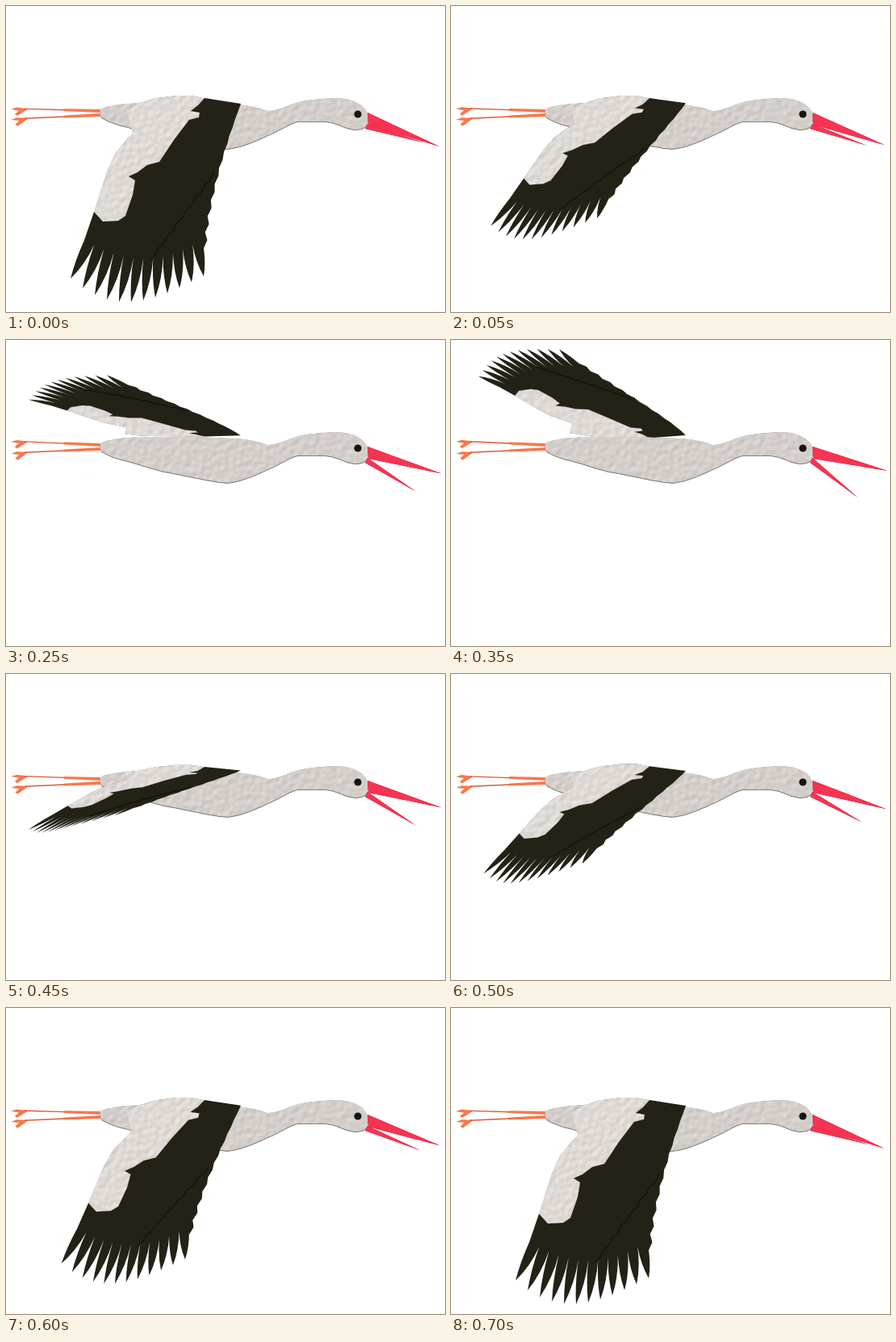
An HTML page for the animation above (750 ms loop, 544 by 379 pixels).

```html
<!DOCTYPE html>
<html lang="en">
<head>
<meta charset="utf-8">
<title>Flying stork</title>
<style>
html, body { margin: 0; width: 100%; height: 100%; overflow: hidden; background: #fff; }
svg { display: block; width: 100vw; height: 100vh; }
#body { fill: #d3cdca; filter: url(#bumps) drop-shadow(0 1px 0 #85807c); }
#white { fill: #ded8d4; filter: url(#bumps) drop-shadow(0 .5px 0 #b5afaa); }
#black { fill: #242116; }
#crease { fill: none; stroke: #0e0d08; }
.beak { fill: #f73352; filter: drop-shadow(0 .8px 0 #8d1730); }
</style>
</head>
<body>
<svg viewBox="0 0 544 379">
  <defs>
    <filter id="bumps" filterUnits="userSpaceOnUse" x="0" y="0" width="544" height="379" color-interpolation-filters="sRGB">
      <feTurbulence type="fractalNoise" baseFrequency=".15" numOctaves="1" seed="4"/>
      <feDiffuseLighting surfaceScale=".55" diffuseConstant="1" lighting-color="#fff" result="light">
        <feDistantLight azimuth="235" elevation="62"/>
      </feDiffuseLighting>
      <feComposite in="SourceGraphic" in2="light" operator="arithmetic" k1="1.14"/>
      <feComposite in2="SourceGraphic" operator="in"/>
    </filter>
    <g id="leg">
      <path d="M0 -2L-44 -1.5 -47 0 -44 1.5 0 2ZM-91 -.5L-104 -1.5 -111 1 -101 2.5 -106 7 -103 9 -91 1Z" fill="#f5794e"/>
      <path d="M-44 0H-94" stroke="#dd5a30" stroke-width="1.3"/>
    </g>
  </defs>
  <use id="topLeg" href="#leg"/>
  <use href="#leg" transform="translate(117 135) rotate(-2.6)"/>
  <path id="body" d="M119 126C135 122 150 120 168 120L240 120 288 122Q310 124 325 130C343 128 352 121 365 118Q388 114 408 114C432 113 450 125 449 140Q449 153 434 153C418 153 412 143 390 143L362 143C348 147 342 153 325 160Q292 176 274 177C250 175 225 168 195 163C172 157 160 152 142 148Q128 144 118 138 114 130 119 126Z"/>
  <g id="wing">
    <path id="white"/>
    <path id="black"/>
    <path id="crease"/>
  </g>
  <path id="lower" class="beak"/>
  <path id="upper" class="beak"/>
  <circle cx="436" cy="134" r="4.6" fill="#17150f"/>
</svg>
<script>
const el = id => document.getElementById(id);
const range = (n, fn) => Array.from({ length: n }, (_, i) => fn(i)).join(' ');

// Wing in its lowest position
const FEATHERS = 12;
const notch = i => [97 + 12.2 * i, 290 + 22 * Math.sin(Math.PI * i / FEATHERS)];
const feathers = range(FEATHERS, i => {
  const [ax, ay] = notch(i), [bx, by] = notch(i + 1);
  const x = 80 + 15 * i, y = 330 + 37 * Math.sin(Math.PI * ((i + .4) / FEATHERS) ** .8);
  return `Q${(ax + x) / 2 - 3} ${(ay + y) / 2 + 2} ${x} ${y}Q${(bx + x) / 2 + 4} ${(by + y) / 2 + 3} ${bx} ${by}`;
});
const frontEdge = range(19, i => {
  const t = i / 18;
  return `${245 + 46 * t ** 1.5 + i % 2 * 4 * (1 - t)} ${300 - 179 * t}`;
});
const crease = range(15, i => `${258 - 5.7 * i} ${205 + 7.8 * i + i % 2 * 4}`);
const border = 'L238 123 229 130 240 132 239 138 227 141 208 166 190 193 175 197 163 206 152 211 160 216 157 234 148 260 139 266 120 267 109 255';
const wing = {
  white: `M166 120L185 114 210 111 230 111 246 114${border}L125 205 135 183 148 167 157 157 148 128Z`,
  black: `M246 114${border}L97 290${feathers}L${frontEdge}Z`,
  crease: `M${crease}`
};

function draw(step) {
  // The wing eases up for seven steps and sweeps back down for seven
  const lift = step <= 7 ? Math.sin(Math.PI / 2 * step / 7) : ((14 - step) / 7) ** 2.1;
  const swing = 4 * lift * (1 - lift);
  const jaw = 1 - Math.abs(step - 7) / 7;

  const warp = (_, px, py) => {
    const x = +px, y = +py, reach = (y - 119) / 215, front = (x - 80) / 164;
    const back = (45 + 65 * front) * lift + (29 + 27 * front) * swing;
    const rise = (288 + 34 * front) * (reach < 0 ? lift ** 3 : lift);
    return `${(x - back * Math.max(0, reach) ** 1.4).toFixed(1)} ${(y - rise * reach).toFixed(1)}`;
  };
  for (const id in wing) el(id).setAttribute('d', wing[id].replace(/([\d.]+) ([\d.]+)/g, warp));
  el('body')[lift > .72 ? 'before' : 'after'](el('wing'));

  el('upper').setAttribute('d', `M448 132L${537 + 4 * jaw} ${174 - 12 * jaw} 449 147Z`);
  el('lower').setAttribute('d', `M448 146L${517 - 13 * jaw} ${169 + 26 * jaw} 445 152Z`);
  el('topLeg').setAttribute('transform', `translate(117 130) rotate(${1.6 + lift})`);
}

const start = performance.now();
let shown = -1;
function tick() {
  const step = Math.floor((performance.now() - start) / 50) % 15;
  if (step !== shown) draw(shown = step);
  requestAnimationFrame(tick);
}
tick();
</script>
</body>
</html>
```
